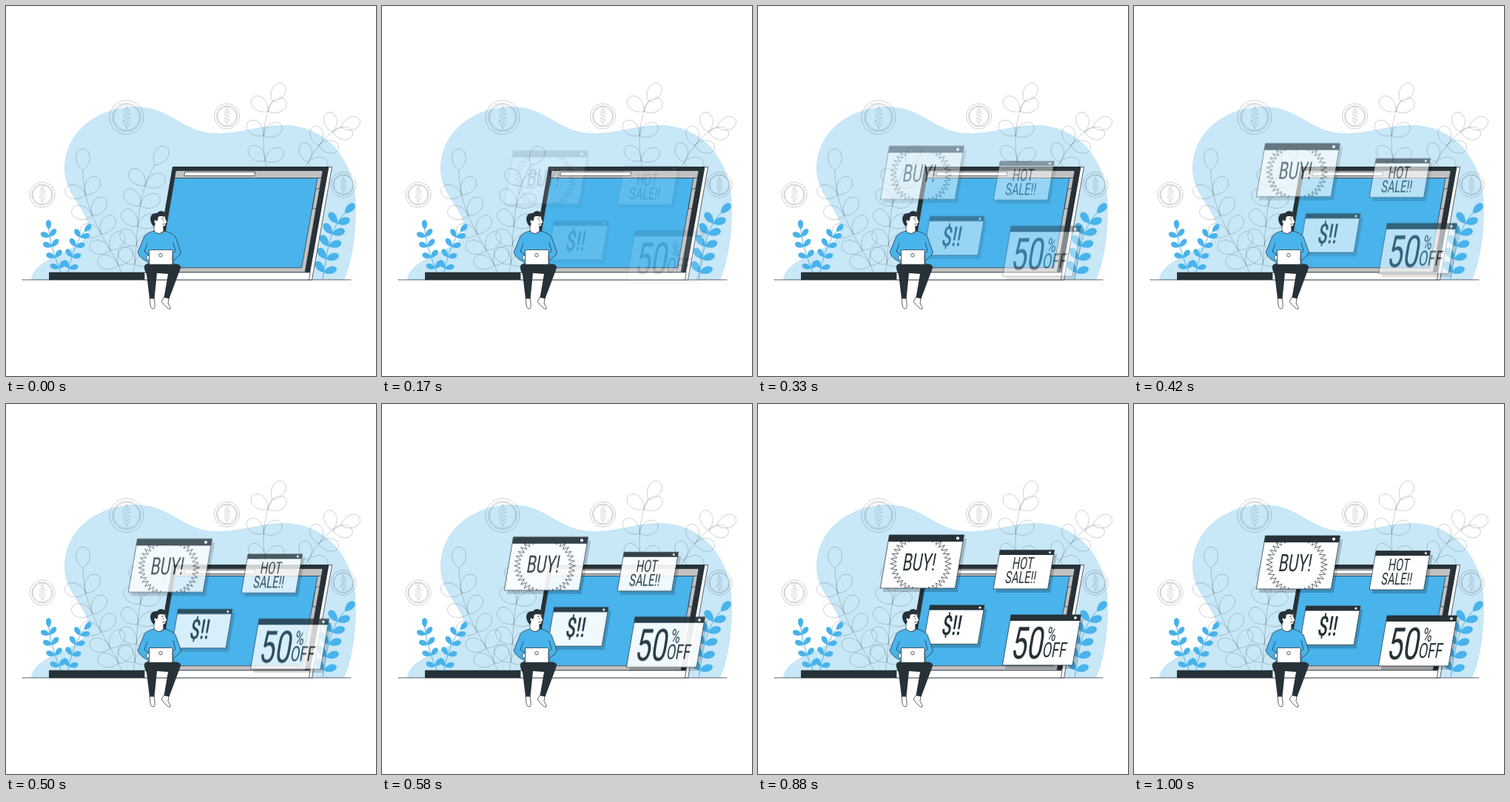
Write an HTML page that moves like this. It is 500 by 500 pixels and loops after 1040 ms.

```html
<!DOCTYPE html>
<html lang="en">
<head>
<meta charset="utf-8">
<title>Pop-up windows</title>
<style>
  html, body { margin: 0; width: 100%; height: 100%; overflow: hidden; background: #fff; }
  svg { display: block; width: 100%; height: 100%; }
  text { font-family: Roboto, "Liberation Sans", sans-serif; text-anchor: middle; fill: #263238; }
  .line { fill: none; stroke: #263238; stroke-width: .75; stroke-linejoin: round; stroke-linecap: round; }
  .paper { fill: #fff; stroke: #263238; stroke-width: .75; stroke-linejoin: round; }
  .grey { fill: #c1c1c1; stroke: #263238; stroke-width: .7; }
  .dark { fill: #263238; }
  .blue { fill: #49b3eb; }
  .faint, .faint text { fill: none; stroke: #263238; stroke-opacity: .3; stroke-width: .75; }
  .stem { fill: none; stroke: #49b3eb; }
</style>
</head>
<body>
<svg viewBox="0 0 500 500">
  <path fill="#c8e7f7" d="M34 370C36 355 50 346 72 335C100 323 116 312 110 292C104 271 79 251 79 221C79 165 130 135 178 136C225 138 240 172 285 172C320 172 345 160 378 161C438 163 473 213 473 272C473 310 468 345 457 370Z"/>
  <g id="coins" class="faint"></g>
  <g id="plants"></g>
  <path class="line" d="M22 370H466"/>

  <g id="laptop">
    <path class="paper" d="M434 217.5H440.5L413.5 370H408Z"/>
    <path class="dark" d="M225 217H436.5L411 360H200Z"/>
    <path class="grey" d="M229.5 222.5H428L404 360H206Z"/>
    <path class="line" d="M228 232.5H426"/>
    <path class="grey" fill-opacity=".8" d="M418.5 247H424L419 274H414Z"/>
    <path class="paper" d="M242 224.3H337L335.5 229.5H240.5Z"/>
    <path class="blue" stroke="#263238" stroke-width=".7" d="M228 232.5H421L399.5 353.7H207Z"/>
    <path class="paper" d="M187 360H411L409.5 370H187Z"/>
    <path class="dark" d="M58 359.7H187V370.2H58Z"/>
  </g>

  <g id="cards"></g>

  <g id="man">
    <path class="paper" d="M194 394L195 404Q196 410 200 409Q202 407 201 402L200 394ZM214 393L210 399Q213 404 218 408Q222 411 222.5 408L219 402L220 394Z"/>
    <path class="dark" d="M187 351Q190 347 198 348L229 348.500Q237 349 236 354L220.500 395.500L213.500 394L219 362L204 361L200.500 395.500H194L190 363Q186 355 187 351Z"/>
    <path class="blue" stroke="#263238" stroke-width=".75" stroke-linejoin="round" d="M200 304Q191 306 187 311L178 333Q181 341 190 345L194 349H225L227 343Q234 339 236.500 333L229 312Q224 306 214 304Q207 311 200 304Z"/>
    <path class="line" d="M191 321L187 332L193 336M226 320L229 331L225 335"/>
    <path class="paper" d="M200 289V304Q207 311 213 304L212.500 298Q216 298 216 294L217.500 292L215.500 287V281H205Z"/>
    <path class="dark" d="M200 298Q195 294 195 287Q196 279 204 280Q207 276 212 277.500Q217 279 214.500 285Q209 283 205.500 285Q206 289 203.500 291Q202 288 200.500 290Q199.500 292 202 294Z"/>
    <path class="line" d="M210 287.500L213 286.500M212.500 289.500V290.500M211.500 295L214.500 294.500"/>
    <path class="paper" d="M193.500 329.500H223.500Q225 329.500 225 331V349.300H193.500Z"/>
    <circle class="paper" cx="209" cy="336.700" r="2.300"/>
    <path class="paper" d="M191 337Q188 340 192 344L193.500 342V337ZM225 337Q228 340 225 343Z"/>
  </g>
</svg>
<script>
const SLANT = 0.17, CONDENSE = 0.64;
const LOOP = 1040, FPS = 24, RISE = 20;

const byId = id => document.getElementById(id);
const bezier = (a, b, c, d, t) =>
  (1 - t) ** 3 * a + 3 * (1 - t) ** 2 * t * b + 3 * (1 - t) * t * t * c + t ** 3 * d;

// Narrow lettering with its baseline centre at x, y.
const lettering = (str, x, y, size, weight = 400, slant = SLANT) =>
  `<text font-size="${size}" font-weight="${weight}" transform="matrix(${CONDENSE} 0 ${-slant} 1 ${x} ${y})">${str}</text>`;

// Teardrop leaf growing from (x, y).
function leaf(x, y, angle, length, fat) {
  const dx = length * Math.cos(angle), dy = length * Math.sin(angle);
  const at = (u, v) => `${(x + u * dx - v * dy).toFixed(1)} ${(y + u * dy + v * dx).toFixed(1)}`;
  return `M${at(0, 0)}C${at(.3, -fat)} ${at(.95, -fat)} ${at(1, 0)}C${at(.95, fat)} ${at(.3, fat)} ${at(0, 0)}`;
}

// Leaf pairs spread evenly along a cubic stem, with one more leaf on its tip.
function plant([a, b, c, d], pairs, length, solid) {
  const SPREAD = .95, FIRST = .09, LAST = .81;
  const fat = solid ? .37 : .43;
  const axis = Math.atan2(d[1] - a[1], d[0] - a[0]);
  let leaves = leaf(...d, Math.atan2(d[1] - c[1], d[0] - c[0]), length, fat);
  for (let i = 0; i < pairs; i++) {
    const t = FIRST + (LAST - FIRST) * i / (pairs - 1);
    const [x, y] = [0, 1].map(k => bezier(a[k], b[k], c[k], d[k], t));
    for (const side of [-SPREAD, SPREAD]) leaves += leaf(x, y, axis + side, length, fat);
  }
  const stem = `M${a}C${b} ${c} ${d}`;
  return solid
    ? `<path class="stem" d="${stem}"/><path class="blue" d="${leaves}"/>`
    : `<path class="faint" d="${stem}${leaves}"/>`;
}

function coin(x, y, r) {
  const ring = k => `<circle cx="${x}" cy="${y}" r="${r * k}"/>`;
  return ring(1) + ring(.83) + ring(.76) + lettering('$', x, y + r * .48, r * 1.35, 700, 0);
}

function starburst(x, y, outer, inner, spikes) {
  const points = Array.from({ length: spikes * 2 }, (_, i) => {
    const r = i % 2 ? inner : outer, a = i * Math.PI / spikes;
    return `${(x + r * Math.cos(a)).toFixed(1)},${(y + r * Math.sin(a)).toFixed(1)}`;
  });
  return `<polygon class="line" points="${points.join(' ')}"/>`;
}

// A window leaning right: x, y is its top left corner.
function card(x, y, w, h, bar, content) {
  const outline = height => `M${x} ${y}h${w}l${-height * SLANT} ${height}h${-w}Z`;
  const clip = `card${x}`;
  return `<clipPath id="${clip}"><path d="${outline(h)}"/></clipPath>
    <path d="${outline(h)}" transform="translate(3.5 5)" fill-opacity=".2"/>
    <path class="paper" d="${outline(h)}"/><g clip-path="url(#${clip})">${content}</g>
    <path class="dark" d="${outline(bar)}"/>
    <circle cx="${x + w - bar * .95}" cy="${y + bar / 2}" r="${bar * .23}" fill="#fff"/>`;
}

byId('coins').innerHTML =
  coin(163, 150.5, 23) + coin(298.5, 149, 17) + coin(49, 255, 17) + coin(456, 241.5, 17);

byId('plants').innerHTML =
  plant([[156, 360], [143, 325], [104, 285], [104, 222]], 5, 29) +
  plant([[172, 360], [180, 320], [172, 262], [201, 215]], 5, 29) +
  plant([[352, 217], [344, 190], [348, 149], [360, 129]], 3, 28) +
  plant([[405, 217], [416, 196], [432, 172], [453, 164]], 3, 27) +
  plant([[74, 360], [66, 340], [59, 318], [58, 302]], 4, 13, true) +
  plant([[84, 360], [87, 340], [96, 316], [106, 305]], 4, 13, true) +
  plant([[428, 369], [434, 335], [436, 302], [458, 280]], 5, 18, true);

byId('cards').innerHTML =
  card(177.5, 178, 101, 72, 9, starburst(220, 217, 41, 33, 38) + lettering('BUY!', 216.5, 226, 32.5)) +
  card(327, 198.5, 73.5, 52.5, 6.5, lettering('HOT', 357, 224.5, 22.5) + lettering('SALE!!', 354, 243.5, 22.5)) +
  card(232.5, 273, 73.5, 52.5, 6.5, lettering('$!!', 260, 313, 37, 500)) +
  card(342, 286, 94.5, 68, 8,
    lettering('50', 362, 345, 60) + lettering('%', 395.5, 321, 26) + lettering('OFF', 399.5, 343, 28));

// Ease with a slight overshoot before settling.
function ease(x) {
  if (x >= 1) return 1;
  let lo = 0, hi = 1;
  for (let i = 0; i < 24; i++) {
    const mid = (lo + hi) / 2;
    if (bezier(0, .36, .5, 1, mid) < x) lo = mid; else hi = mid;
  }
  return bezier(0, -.01, 1.38, 1, lo);
}

const cards = byId('cards');

function draw(ms) {
  const step = Math.floor((ms % LOOP + 5) * FPS / 1000);
  const p = ease((step + .5) / FPS);
  cards.setAttribute('opacity', Math.max(0, Math.min(1, p)).toFixed(4));
  cards.setAttribute('transform', `translate(0 ${(RISE * (1 - p)).toFixed(3)})`);
}

const start = performance.now();
function tick() {
  draw(performance.now() - start);
  requestAnimationFrame(tick);
}
draw(0);
requestAnimationFrame(tick);
</script>
</body>
</html>
```
